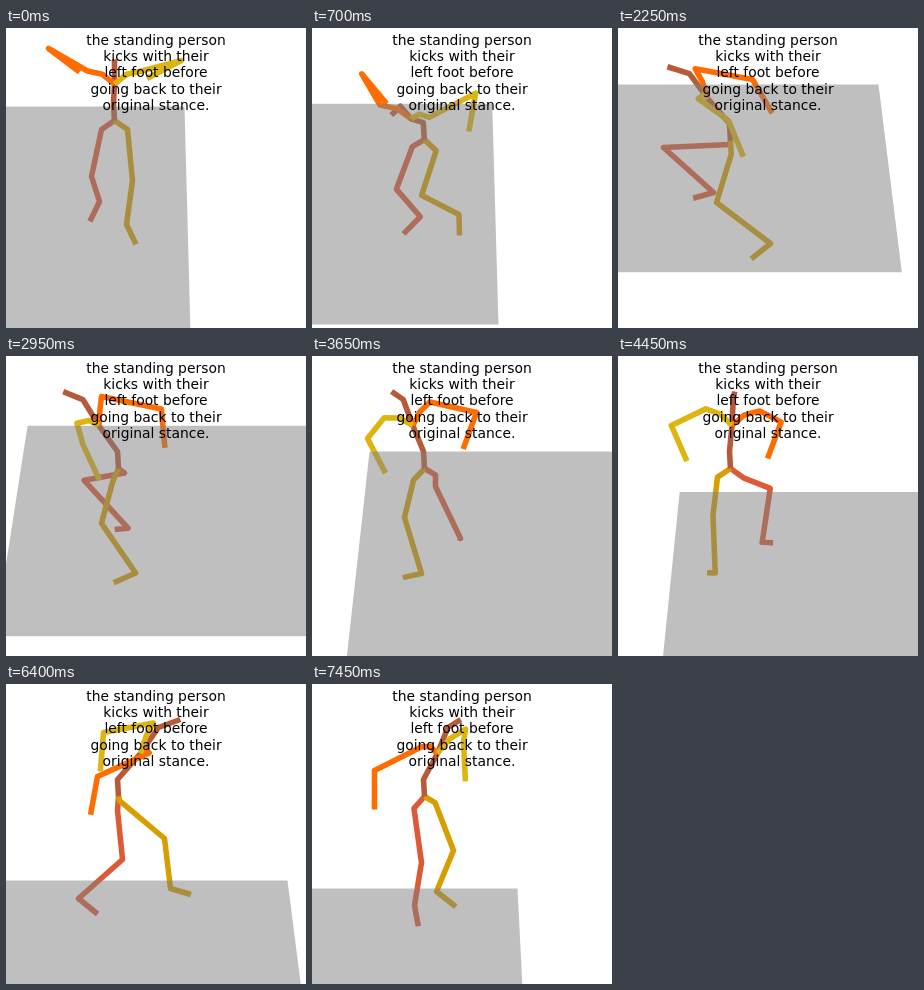
Animation, 300 px wide and 300 px high, one loop 7.5 s. Source, as an HTML page:

```html
<!DOCTYPE html>
<html lang="en">
<head>
<meta charset="utf-8">
<title>Stick figure kick</title>
<style>
  html, body { margin: 0; width: 100%; height: 100%; overflow: hidden; background: #fff; }
  svg { display: block; width: 100vw; height: 100vh; }
  polyline { fill: none; stroke-width: 5.56; stroke-linejoin: round; }
  text { font: 13.89px "DejaVu Sans", sans-serif; text-anchor: middle; }
</style>
</head>
<body>
<svg viewBox="0 0 300 300">
  <g transform="translate(.5 .5)">
    <g id="limbs"></g>
    <polygon id="floor" fill="#808080" fill-opacity=".5"/>
  </g>
  <g id="title"></g>
</svg>
<script>
const LOOP = 7500, STEP = 50;
const TURN = -5.7;                        // total rotation of the body over one loop
const VANISH = [155, -790], WIDTH = .3525; // floor perspective
const FOREARM = 39, SPLAY = .45;

const { sin, cos, exp, floor, min } = Math;
const add = (p, x, y) => [p[0] + x, p[1] + y];
const mix = (p, q, k) => p.map((v, i) => v + (q[i] - v) * k);

// Key points per time: floor corner, right knee and ankle, left knee and ankle,
// then for each arm the elbow and the angle of the hanging forearm.
const keys = [
  [0,    178, 78,   85, 148, 93, 173,   126, 152, 120, 196,  42, 20, .92,   175, 32, -1.09],
  [1350, 184, 70,   81, 172, 121, 202,  94, 180, 170, 177,   65, 68, .49,   143, 94, .64],
  [2250, 260, 56,   45, 119, 95, 164,   98, 174, 152, 215,   134, 51, .53,  110, 92, .39],
  [3650, 369, 95,   123, 130, 148, 182, 92, 161, 109, 217,   164, 56, -.35, 55, 82, .48],
  [5250, 395, 173,  166, 134, 133, 190, 101, 157, 91, 215,   159, 78, -.36, 52, 56, .27],
  [6400, 281, 196,  116, 175, 72, 214,  158, 154, 164, 204,  91, 92, -.18,  97, 48, -.08],
  [7450, 205, 204,  109, 178, 102, 221, 141, 166, 124, 207,  62, 86, 0,     151, 58, .05]
];

// Tangent at a key, flat at turning points so nothing overshoots.
function tangent(i, n) {
  if (i === 0 || i === keys.length - 1) return 0;
  const [a, b, c] = keys.slice(i - 1, i + 2);
  const d0 = (b[n] - a[n]) / (b[0] - a[0]), d1 = (c[n] - b[n]) / (c[0] - b[0]);
  return d0 * d1 <= 0 ? 0 : 2 * d0 * d1 / (d0 + d1);
}

function sample(time) {
  let i = 0;
  while (i < keys.length - 2 && time >= keys[i + 1][0]) i++;
  const a = keys[i], b = keys[i + 1];
  const span = b[0] - a[0], u = min(1, (time - a[0]) / span);
  const s = u * u * (3 - 2 * u);
  return a.map((v, n) => v + (b[n] - v) * s +
    span * u * (1 - u) * ((1 - u) * tangent(i, n) - u * tangent(i + 1, n)));
}

function torso(time, facing) {
  const rise = exp(-((time / 400) ** 2));
  const bend = exp(-(((time - 900) / 800) ** 2));
  const lean = sin(facing) * (1 + .5 * bend), height = 1 - .55 * bend;
  const pelvis = [112 - 4 * rise, 112 - 20 * rise];
  const chest = add(pelvis, 22 * lean, -43 * height);
  const neck = add(chest, 18 * lean, -26 * height);
  const head = add(neck, 22 * sin(facing), -8 + 18 * bend);
  return { pelvis, belly: add(pelvis, -1, -17), chest, neck, head };
}

// side is -1 for the right limb, 1 for the left one.
function leg(pelvis, knee, ankle, facing, side) {
  const hip = add(pelvis, side * 13 * cos(facing), 9 - side * 5 * sin(facing));
  const aim = facing + side * SPLAY;
  return [pelvis, hip, knee, ankle, add(ankle, 22 * sin(aim), 10 + 11 * cos(aim))];
}

function arm({ chest, neck }, elbow, swing, facing, side) {
  const shoulder = add(mix(chest, neck, .6),
    side * 27 * cos(facing), -side * 15 * sin(facing));
  const collar = add(mix(chest, shoulder, .45), 0, -4);
  const wrist = add(elbow, FOREARM * sin(swing), FOREARM * cos(swing));
  return [chest, collar, shoulder, elbow, wrist];
}

function make(tag, parent, attrs) {
  const el = document.createElementNS("http://www.w3.org/2000/svg", tag);
  for (const name in attrs) el.setAttribute(name, attrs[name]);
  return parent.appendChild(el);
}

const limbs = document.getElementById("limbs");
const ground = document.getElementById("floor");
const title = document.getElementById("title");

const lines = ["#DD5A37", "#D69E00", "#B75A39", "#FF6D00", "#DDB50E"]
  .map(stroke => make("polyline", limbs, { stroke }));

["the standing person", "kicks with their", "left foot before", "going back to their",
  "original stance."].forEach((words, i) => {
  make("text", title, { x: 150, y: 17 + i * 16.22 }).textContent = words;
});

const setPoints = (el, pts) => el.setAttribute("points", pts.join(" "));

function draw(time) {
  const k = sample(time);
  const point = n => [k[n], k[n + 1]];
  const facing = TURN * (time / LOOP) ** 1.1;
  const body = torso(time, facing);

  [
    leg(body.pelvis, point(3), point(5), facing, -1),
    leg(body.pelvis, point(7), point(9), facing, 1),
    Object.values(body),
    arm(body, point(11), k[13], facing, -1),
    arm(body, point(14), k[16], facing, 1)
  ].forEach((pts, i) => setPoints(lines[i], pts));

  const [x, far] = point(1), near = 92 + 2.71 * far;
  const right = (x - VANISH[0]) / (far - VANISH[1]), left = right - WIDTH;
  const corner = (slope, y) => [VANISH[0] + slope * (y - VANISH[1]), y];
  setPoints(ground, [corner(left, far), corner(right, far),
    corner(right, near), corner(left, near)]);
}

const start = performance.now();
function tick() {
  const time = (performance.now() - start) % LOOP;
  draw(floor(time / STEP) * STEP);
  requestAnimationFrame(tick);
}
tick();
</script>
</body>
</html>
```
